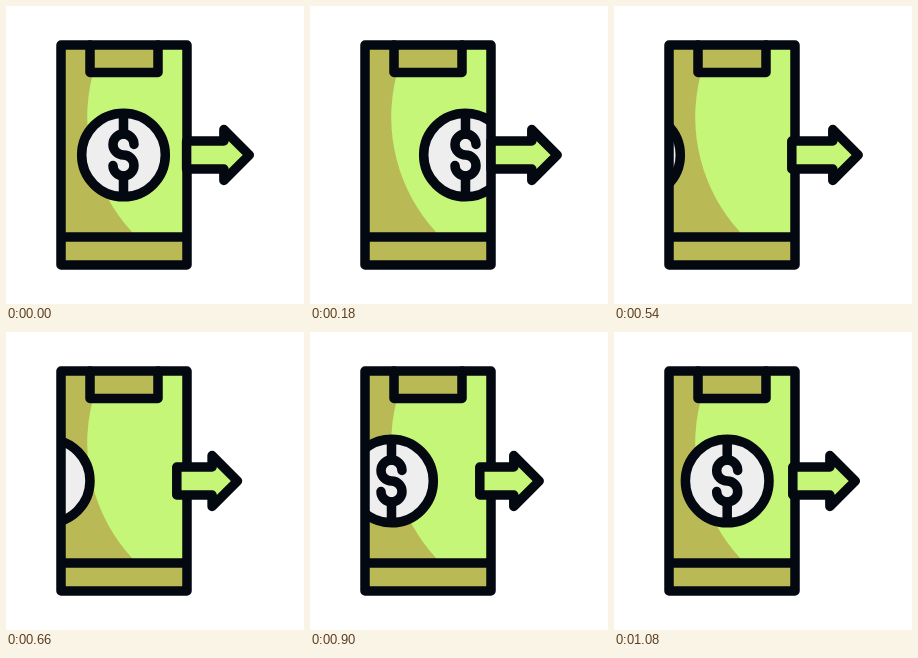
Animation of 298 by 298 pixels, one loop 1.11 s. Source, as an HTML page:

```html
<!DOCTYPE html>
<html lang="en">
<head>
<meta charset="utf-8">
<title>Mobile payment</title>
<style>
  html, body { margin: 0; width: 100%; height: 100%; overflow: hidden; background: #fff; }
  svg { display: block; width: 100vw; height: 100vh; }
  .line { fill: none; stroke: #040811; stroke-width: 9.5; stroke-linecap: round; stroke-linejoin: round; }
  .olive { fill: #b9b955; }
  .lime { fill: #c6f678; }
  .silver { fill: #eeeeef; }
</style>
</head>
<body>
<svg viewBox="0 0 298 298">
  <clipPath id="screen"><rect x="55" y="39" width="126" height="192"/></clipPath>

  <rect class="olive" x="55" y="39" width="126" height="220"/>
  <path class="lime" d="M181 39H95L86 71A170 170 0 0 0 126 226L131 231H181Z"/>

  <g clip-path="url(#screen)">
    <g id="coin">
      <circle class="line silver" r="41.8"/>
      <path class="line" d="M0 -40V-21M0 21V40"/>
      <path class="line" d="M10.5 -10.5A10.5 10.5 0 1 0 0 0A10.5 10.5 0 1 1 -10.5 10.5"/>
    </g>
  </g>

  <path class="line olive" d="M84 39V66.5H152V39"/>
  <path class="line" d="M55 39H181V259H55ZM55 231H181"/>
  <path id="arrow" class="line lime"/>
</svg>
<script>
  const LOOP = 1110, STEP = 30, WRAP = 495;

  // Each key is [time, x]
  const coinOut = [[0, 117.5], [180, 155.5], [300, 181], [495, 222.5]];
  const coinIn = [[495, 18.5], [540, 24.5], [780, 60.5], [900, 81.5], [1080, 113.2], [1110, 117.5]];
  const tipKeys = [[0, 243.3], [180, 247.2], [300, 249.2], [390, 249.5], [540, 244.2],
                   [660, 231.5], [750, 224], [780, 224.2], [900, 229.2], [1080, 241.3]];
  const tailKeys = [[0, 180.6], [300, 181], [420, 180.8], [540, 177.8],
                    [660, 170.8], [750, 166.9], [780, 166.8], [900, 169.8], [1080, 178.8]];

  // Repeats the outer keys so that a curve runs smoothly over the loop
  const shift = ([t, x], by) => [t + by, x];
  const cyclic = keys => [shift(keys.at(-1), -LOOP), ...keys, shift(keys[0], LOOP), shift(keys[1], LOOP)];
  const tip = cyclic(tipKeys), tail = cyclic(tailKeys);

  function slope(keys, i) {
    const a = keys[Math.max(i - 1, 0)], b = keys[Math.min(i + 1, keys.length - 1)];
    return (b[1] - a[1]) / (b[0] - a[0]);
  }

  // Cubic Hermite curve through the keys
  function curve(keys, t) {
    let i = 0;
    while (i < keys.length - 2 && t >= keys[i + 1][0]) i++;
    const [t0, x0] = keys[i], [t1, x1] = keys[i + 1];
    const d = t1 - t0, u = (t - t0) / d, v = 1 - u;
    return v * v * (1 + 2 * u) * x0 + u * u * (3 - 2 * u) * x1
      + d * u * v * (v * slope(keys, i) - u * slope(keys, i + 1));
  }

  const coin = document.getElementById('coin');
  const arrow = document.getElementById('arrow');

  function draw(t) {
    const x = curve(t < WRAP ? coinOut : coinIn, t);
    coin.setAttribute('transform', `translate(${x} 149)`);
    const end = curve(tip, t), neck = end - 25.4;
    arrow.setAttribute('d',
      `M${curve(tail, t)} 135H${neck}V123.6L${end} 149L${neck} 174.4V163H${curve(tail, t)}Z`);
  }

  const start = performance.now();
  function tick() {
    const t = (performance.now() - start) % LOOP;
    draw(Math.floor(t / STEP) * STEP);
    requestAnimationFrame(tick);
  }
  tick();
</script>
</body>
</html>
```
